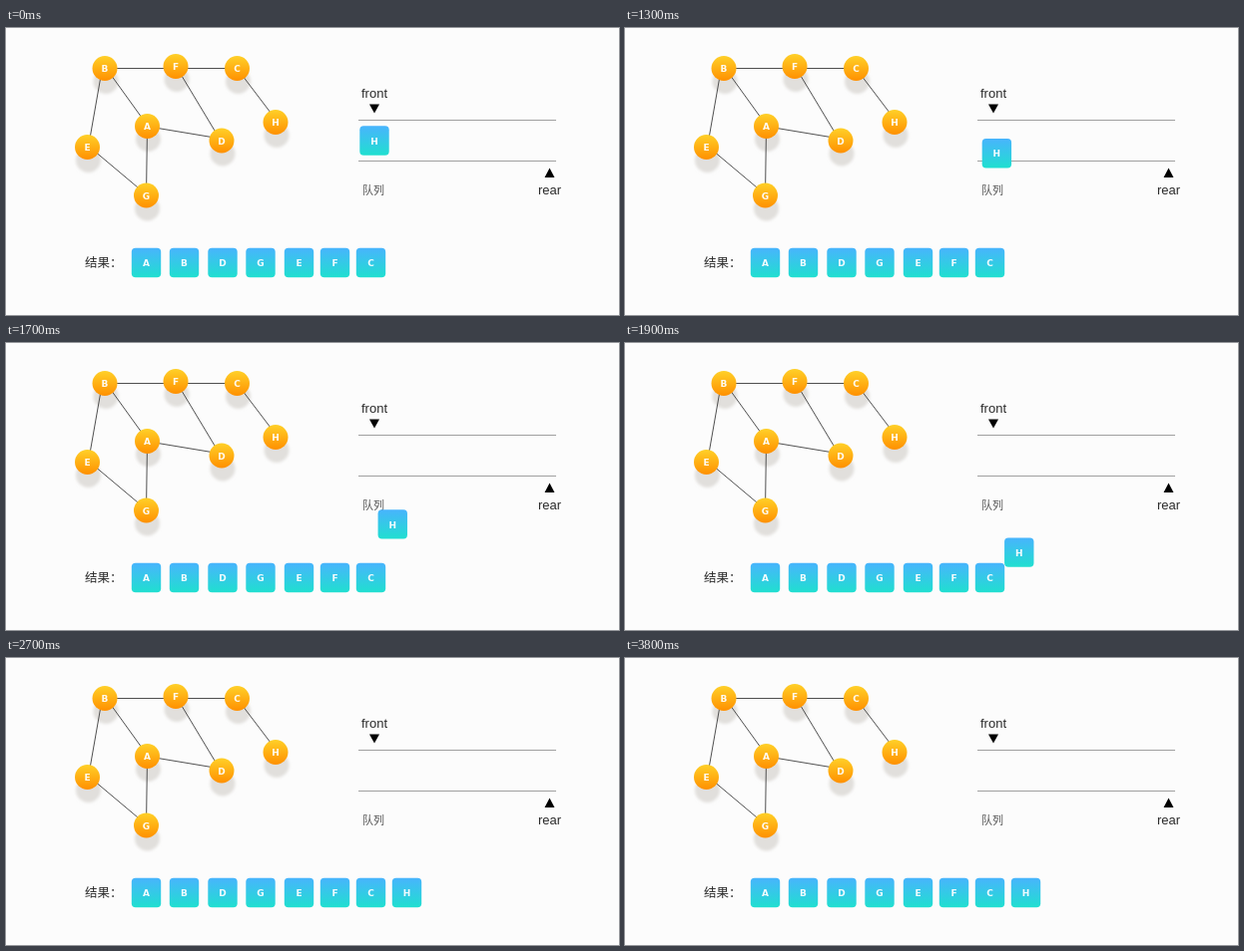
These frames come from a looping animation (614x288 px, 3.9 s). An HTML page:

```html
<!DOCTYPE html>
<html lang="zh-CN">
<head>
<meta charset="utf-8">
<title>广度优先遍历</title>
<style>
  html, body { margin: 0; height: 100%; overflow: hidden; background: #fcfcfc; }
  svg { display: block; }
  .letter { font: bold 9px "DejaVu Sans", sans-serif; fill: #fff; fill-opacity: .93; text-anchor: middle; }
  .label { font: 13px "Liberation Sans", Arial, sans-serif; fill: #2a2a2a; }
  .cjk { font-family: "Noto Sans CJK SC", "Noto Sans CJK", sans-serif; }
</style>
</head>
<body>
<svg width="614" height="288" viewBox="0 0 614 288">
  <defs>
    <linearGradient id="orange" x2="0" y2="1">
      <stop stop-color="#ffd028"/><stop offset="1" stop-color="#ff9000"/>
    </linearGradient>
    <linearGradient id="blue" x2="0" y2="1">
      <stop stop-color="#48b4fd"/><stop offset="1" stop-color="#20dfd0"/>
    </linearGradient>
    <filter id="soft" x="-30%" y="-30%" width="160%" height="160%">
      <feGaussianBlur stdDeviation="1.6"/>
    </filter>
  </defs>
  <g id="shadows" fill="#e1dfdc" filter="url(#soft)"></g>
  <path stroke="#505050" fill="none" d="M99 40.5H170L231 40.5M94.5 51L84.5 108M106.5 49L136 90
    M176 48L209 103M238.5 50L265 85M152 100.5L206 109.5M141.5 98L140.5 168M91 125.5L132 160"/>
  <g id="nodes"></g>

  <path d="M353 92.5H551M353 133.5H551" stroke="#a0a0a0"/>
  <path d="M364 76.5h10l-5 9zM539.5 150h10l-5-9.5z"/>
  <text class="label" x="356" y="70">front</text>
  <text class="label" x="533" y="167">rear</text>
  <text class="label cjk" x="357" y="166.5" style="font-size:11px;fill:#555">队列</text>
  <text class="label cjk" x="79" y="239.7" style="font-size:12.5px">结果：</text>
  <g id="tiles"></g>
</svg>
<script>
const LOOP = 3900, STEP = 100;
const nodes = {
  A: [141.5, 98.5], B: [99, 40.5], C: [231.5, 40.5], D: [216, 113],
  E: [81.5, 119.5], F: [170, 38.5], G: [140.5, 168], H: [270, 94.5]
};
const results = { A: 140.5, B: 178.5, D: 217, G: 255, E: 293.5, F: 329.5, C: 365.5 };
const move = { from: [369, 113], to: [401.5, 235.5], start: 1092, end: 2200, ramp: 0.217 };

function add(parent, tag, attrs, text = '') {
  const el = document.createElementNS('http://www.w3.org/2000/svg', tag);
  for (const key in attrs) el.setAttribute(key, attrs[key]);
  el.textContent = text;
  return parent.appendChild(el);
}
const group = id => document.getElementById(id);
const addLetter = (parent, x, y, letter) =>
  add(parent, 'text', { x, y: y + 3.7, class: 'letter' }, letter);

function addTile(letter, x, y) {
  const tile = add(group('tiles'), 'g', { transform: `translate(${x} ${y})` });
  add(tile, 'rect', { x: -14.7, y: -14.7, width: 29.4, height: 29.4, rx: 4, fill: 'url(#blue)' });
  addLetter(tile, 0, 0, letter);
  return tile;
}

for (const [letter, [x, y]] of Object.entries(nodes)) {
  add(group('shadows'), 'circle', { cx: x + 1, cy: y + 13, r: 12.5 });
  add(group('nodes'), 'circle', { cx: x, cy: y, r: 12.5, fill: 'url(#orange)' });
  addLetter(group('nodes'), x, y, letter);
}
for (const letter in results) addTile(letter, results[letter], 235.5);
const mover = addTile('H', ...move.from);

// Constant speed with a short acceleration and braking phase.
function ease(p, r) {
  if (p > 0.5) return 1 - ease(1 - p, r);
  return (p < r ? p * p / (2 * r) : p - r / 2) / (1 - r);
}

function draw(now) {
  const t = Math.floor(now % LOOP / STEP) * STEP;
  const p = Math.min(1, Math.max(0, (t - move.start) / (move.end - move.start)));
  const k = ease(p, move.ramp);
  const [x, y] = move.from.map((v, i) => v + (move.to[i] - v) * k);
  mover.setAttribute('transform', `translate(${x} ${y})`);
}

const begin = performance.now();
function frame() {
  draw(performance.now() - begin);
  requestAnimationFrame(frame);
}
frame();
</script>
</body>
</html>
```
